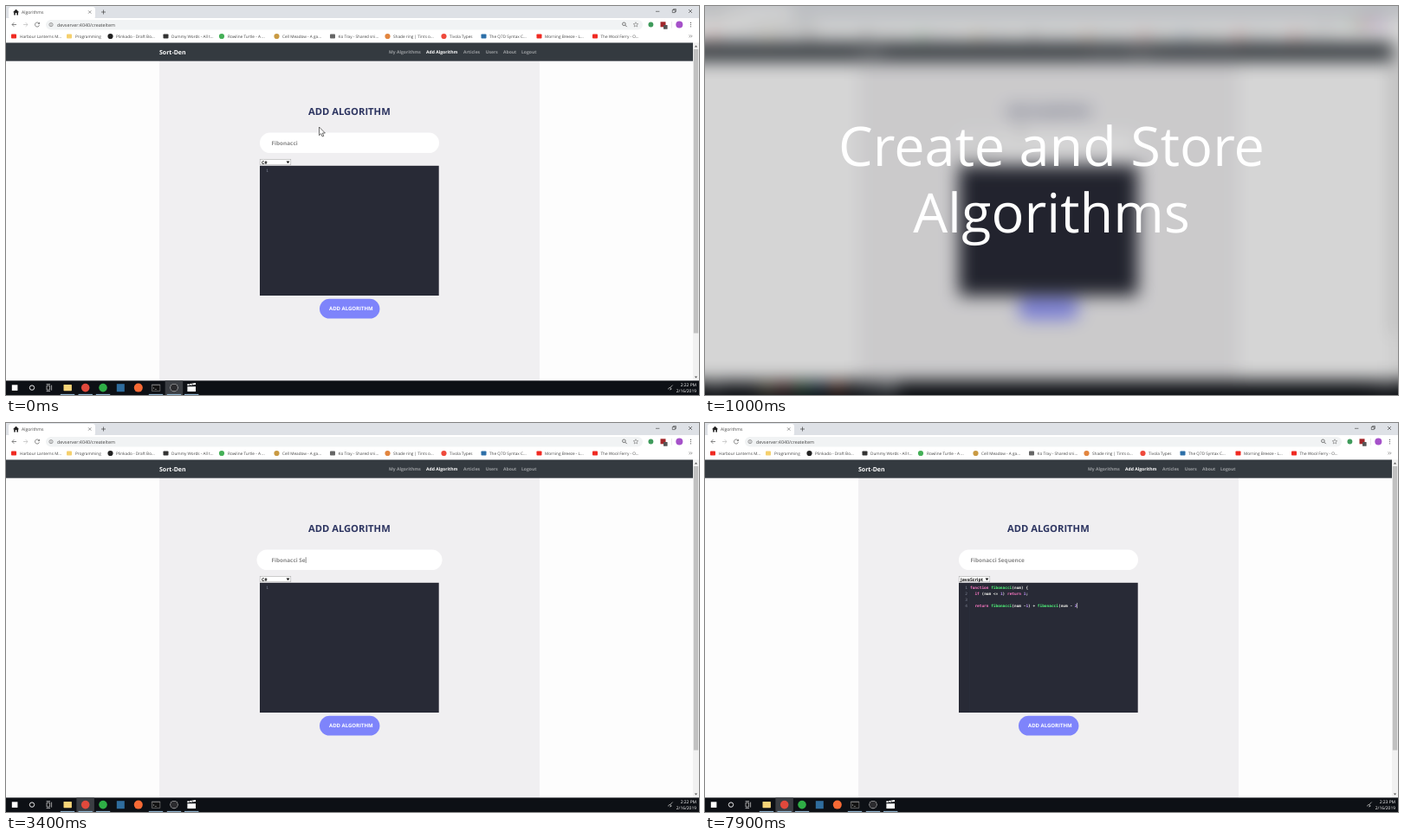
An HTML page for the animation above (8000 ms loop, 800 by 450 pixels).

```html
<!DOCTYPE html>
<html lang="en">
<head>
<meta charset="utf-8">
<title>Algorithms</title>
<style>
  html, body { margin: 0; width: 800px; height: 450px; overflow: hidden; background: #fdfdfd; }
  #stage { position: relative; width: 800px; height: 450px; overflow: hidden; }
  svg { position: absolute; left: 0; top: 0; overflow: visible; }
  text { font-family: "Open Sans", "Noto Sans", sans-serif; text-rendering: geometricPrecision; white-space: pre; }
  .b { font-weight: 700; }
  .mono { font-family: "DejaVu Sans Mono", "Liberation Mono", monospace; font-size: 4.46px; }
  #shade { position: absolute; inset: 0; background: #000; }
</style>
</head>
<body>
<div id="stage">
  <svg id="page" width="800" height="450"></svg>
  <div id="shade"></div>
  <svg id="title" width="800" height="450">
    <g font-size="63" fill="#fff" text-anchor="middle">
      <text x="400" y="185">Create and Store</text>
      <text x="400" y="262">Algorithms</text>
    </g>
  </svg>
</div>
<script>
const LOOP = 8000, STEP = 100, CUT = 3400;
const $ = id => document.getElementById(id);
const page = $('page');

function add(tag, attrs, content) {
  const el = document.createElementNS('http://www.w3.org/2000/svg', tag);
  for (const k in attrs) el.setAttribute(k, attrs[k]);
  if (content !== undefined) el.textContent = content;
  page.appendChild(el);
  return el;
}
const rect = (x, y, width, height, fill, rx = 0) => add('rect', { x, y, width, height, fill, rx });
const dot = (cx, cy, r, fill) => add('circle', { cx, cy, r, fill });
const ring = (cx, cy, r, stroke, w) => add('circle', { cx, cy, r, stroke, 'stroke-width': w, fill: 'none' });
const line = (d, stroke, w = 0.7) => add('path', { d, stroke, 'stroke-width': w, fill: 'none' });
const shape = (d, fill) => add('path', { d, fill });
const text = (x, y, size, fill, str, cls = '') => add('text', { x, y, 'font-size': size, fill, class: cls }, str);
const band = (y, h, fill) => rect(-40, y, 880, h, fill); // runs past the edges so that blur stays solid

// Browser frame
band(-40, 54, '#dee1e6');
band(14, 29, '#fff');
rect(3, 1, 100, 14, '#fff', 3);
shape('M8 7.2 L11.6 3.8 L15.2 7.2 H14 V10.4 H12.4 V8 H10.8 V10.4 H9.2 V7.2 Z', '#222');
text(18, 9, 5, '#444', 'Algorithms');
line('M95 5.3 l3.4 3.4 m0 -3.4 l-3.4 3.4', '#555', 0.6);
line('M110 7 h5 m-2.5 -2.5 v5', '#444');
line('M750 6.3 h4.4 M769.3 4.6 h3 v3 h-3 z M770.4 4.6 v-1 h3 v3 h-1 M788 4 l4 4 m0 -4 l-4 4', '#333', 0.6);
line('M12 21.5 H7 m2.3 -2.3 l-2.3 2.3 l2.3 2.3', '#555');
line('M20 21.5 h5 m-2.3 -2.3 l2.3 2.3 l-2.3 2.3', '#bbb');
line('M38.2 20.3 a2.5 2.5 0 1 0 .2 2 M38.6 18.8 v1.8 h-1.8', '#555');
rect(46, 16, 689, 11.4, '#f1f3f4', 5.7);
ring(52, 21.6, 2.1, '#666', 0.6);
line('M52 21.2 v1.6 M52 20.1 v.6', '#666', 0.6);
text(59, 23.6, 5.35, '#444', 'devserver:4040/createItem');
ring(713.4, 20.8, 1.8, '#444', 0.7);
line('M714.8 22.2 l1.9 1.9', '#444', 0.8);
line('M727 18.7 l.8 1.9 2 .1 -1.6 1.3 .6 2 -1.8 -1.1 -1.8 1.1 .6 -2 -1.6 -1.3 2 -.1 z', '#666', 0.5);
dot(744.4, 21.5, 2.9, '#3f9b5b');
rect(755.5, 18.3, 6, 6, '#a2262a');
rect(759, 22, 4.6, 4.8, '#555', 0.6);
line('M768.4 18 v7.5', '#ccc', 0.5);
dot(777.3, 21.6, 4, '#a551c9');
for (const y of [19.4, 21.6, 23.8]) dot(790.5, y, 0.6, '#555');

// Bookmarks: icon x, colour, round?, text x, label
[
  [9, '#f02a22', 0, 16, 'Harbour Lanterns M...'],
  [73, '#f5d06d', 0, 80, 'Programming'],
  [120.5, '#222', 1, 127, 'Plinkado - Draft Bo...'],
  [184.5, '#333', 0, 191, 'Dummy Words - All t...'],
  [249, '#45b058', 1, 256, 'Rowline Turtle - A ...'],
  [312.5, '#c99a43', 1, 319, 'Cell Meadow - A ga...'],
  [377, '#666', 0, 383.5, 'Ko Tray - Shared sni...'],
  [440.5, '#e2853f', 1, 447, 'Shade ring | Tints o...'],
  [505.5, '#ef4a3c', 1, 512, 'Tivola Types'],
  [551.5, '#2c6fa8', 0, 558, 'The Q7D Syntax C...'],
  [615.5, '#f02a22', 0, 622, 'Morning Breeze - L...'],
  [680, '#f02a22', 0, 686.5, 'The Wool Ferry - O...']
].forEach(([x, c, round, tx, label]) => {
  if (round) dot(x, 35, 3.1, c);
  else rect(x - 3, 32.4, 6, 5.2, c, 0.8);
  text(tx, 37, 4.7, '#444', label);
});
line('M788.6 33.4 l1.5 1.5 -1.5 1.5 m2 -3 l1.5 1.5 -1.5 1.5', '#444', 0.5);

// Site
band(42.5, 391, '#fdfdfd');
rect(177, 63, 439, 371, '#f0eff1');
rect(-40, 42.5, 833, 21.2, '#343a40');
text(177, 56.4, 7, '#fff', 'Sort-Den', 'b');
[[442, 'My Algorithms'], [485, 'Add Algorithm'], [528, 'Articles'], [553.7, 'Users'], [574, 'About'], [595, 'Logout']]
  .forEach(([x, s], i) => text(x, 55.4, 5.05, i === 1 ? '#fff' : '#9a9da0', s, 'b'));
rect(793, 42.5, 47, 391, '#f1f1f1');
rect(793.8, 50, 5.4, 328.5, '#c1c1c1');
shape('M794.8 47.4 h3.4 l-1.7 -2 z M794.8 428.6 h3.4 l-1.7 2 z', '#555');
text(349, 126, 11.2, '#2d3561', 'ADD ALGORITHM', 'b');

const field = rect(293, 146.5, 207, 23.6, '#fff', 11.8);
const fieldText = text(306.6, 161, 6.4, '#8a8a8a', '', 'b');
const fieldCaret = rect(0, 155.2, 0.6, 6.8, '#444');

rect(293.2, 177.5, 35.6, 6.3, '#fff').setAttribute('stroke', '#a0a0a0');
page.lastChild.setAttribute('stroke-width', 0.5);
const choice = text(295, 182.6, 5.2, '#111', '', 'b');
shape('M323.6 179.4 h3.8 l-1.9 2.8 z', '#111');

rect(293, 184.8, 206.7, 150.2, '#282a36');
const gutter = line('M305.3 184.8 V335', '#323541', 0.4);
const rows = [0, 1, 2, 3].map(i => {
  const y = 191.5 + i * 7.05;
  const num = text(303, y, 4.46, '#7f8596', i + 1, 'mono');
  num.setAttribute('text-anchor', 'end');
  return { num, y, code: text(306, y, 4.46, '#f8f8f2', '', 'mono b') };
});
const codeCaret = rect(0, 0, 0.6, 6.2, '#f8f8f0');

rect(362, 338.8, 69.4, 22.8, '#7e84fb', 11.4);
text(373, 352.3, 6, '#fff', 'ADD ALGORITHM', 'b');

// Taskbar
band(433.4, 60, '#0d1015');
const active = rect(0, 433.4, 20.5, 16.6, '#3b3e43');
rect(6.8, 438.3, 6.6, 6.6, '#fff');
ring(30, 441.6, 2.7, '#fff', 0.9);
line('M47 439.2 h3.6 v4.8 h-3.6 z M52.6 438.6 v6 M46.6 437.6 h4.4 M46.6 445.6 h4.4', '#ddd', 0.7);
rect(66.5, 438, 9.4, 7.2, '#f6d478', 0.6);
dot(91.7, 441.6, 4.8, '#e0493c');
dot(112, 441.6, 4.8, '#2fae46');
rect(127.8, 437.2, 9, 9, '#2f6d9e');
dot(152.8, 441.6, 5, '#f76a35');
rect(168.4, 438, 9.4, 7.4, '#111');
line('M168.4 438 h9.4 v7.4 h-9.4 z M168.4 438.6 h9.4', '#aaa', 0.5);
line('M169.6 441 l1.3 1 -1.3 1 M171.8 443.4 h2', '#ddd', 0.5);
dot(194, 441.6, 4.6, '#c9c9c9');
dot(194, 441.6, 4, '#2b2b2e');
rect(209.4, 440.2, 9.6, 5.8, '#fff');
line('M209.3 438.4 L219 437', '#fff', 1.8);
line('M211.5 437 l1 2 M214.5 436.6 l1 2', '#111', 0.7);
for (const x of [71, 91.7, 112, 173, 194, 214.2]) rect(x - 8.2, 448.9, 16.4, 1.1, '#8fb4cf');
line('M764 443.4 q2 -3 3.6 -1.4 t-1.4 2 M766.6 441.6 l3 -3', '#ddd', 0.7);
const clock = text(797, 439.6, 4.9, '#fff', '');
const date = text(797, 447.4, 4.9, '#fff', '2/16/2019');
for (const el of [clock, date]) el.setAttribute('text-anchor', 'end');

const pointer = add('path', {
  d: 'M0 0 V9.6 L2.2 7.6 L3.7 11 L5.3 10.3 L3.9 7 H6.9 Z',
  fill: '#fff', stroke: '#111', 'stroke-width': 0.6
});

// Timed steps
const NAME = 'Fibonacci Sequence';
const CODE = `function fibonacci(num) {
  if (num <= 1) return 1;

  return fibonacci(num -1) + fibonacci(num - 2`;
const END = CODE.length;
const typed = [[0, 9], [3400, 12], [3500, 13], [3700, 15], [3900, 16], [4100, 17], [4300, 18]];
const coded = [[0, 0], [6500, 1], [6600, 3], [6700, END - 9], [6800, END - 7], [7000, END - 6], [7100, END - 5],
  [7200, END - 4], [7400, END - 3], [7600, END - 2], [7900, END]];
const moves = [[0, 361.5, 140], [3400, 361.5, 140], [4900, 424, 347], [5200, 385, 246], [5300, 385, 246],
  [5600, 316.3, 182], [6000, 316.3, 190], [6300, 345, 214], [8000, 345, 214]];
const COLORS = [[/^(function|if|return)$/, '#ff79c6'], [/^fib/, '#50fa7b'], [/^\d/, '#bd93f9']];

const clamp = v => Math.min(1, Math.max(0, v));
const held = (table, t) => table.filter(s => s[0] <= t).pop()[1];
const show = (el, on) => el.setAttribute('visibility', on ? 'visible' : 'hidden');

function place(t) {
  const i = Math.max(1, moves.findIndex(m => m[0] > t));
  const [a, ax, ay] = moves[i - 1], [b, bx, by] = moves[i];
  const k = (t - a) / (b - a);
  return [ax + (bx - ax) * k, ay + (by - ay) * k];
}

function paint(el, str) {
  el.textContent = '';
  for (const part of str.match(/\w+|\W+/g) || []) {
    const span = document.createElementNS(el.namespaceURI, 'tspan');
    const hit = COLORS.find(c => c[0].test(part));
    if (hit) span.setAttribute('fill', hit[1]);
    span.textContent = part;
    el.appendChild(span);
  }
}

function draw(t) {
  // Title card over the blurred page
  const p = t < CUT ? clamp(t / 1000) : 0;
  page.style.filter = p ? `blur(${10 * p}px)` : 'none';
  $('shade').style.opacity = 0.155 * p;
  $('title').style.opacity = clamp(p * 1.25);
  $('title').style.transform = `translateY(${37 * (1 - p)}px)`;

  // Name field
  const grow = t < CUT ? 0 : 3.5 * (1 - clamp((t - 5700) / 300));
  field.setAttribute('x', 293 - grow);
  field.setAttribute('width', 207 + 2 * grow);
  fieldText.textContent = NAME.slice(0, held(typed, t));
  fieldCaret.setAttribute('x', 306.8 + fieldText.getComputedTextLength());
  show(fieldCaret, t >= CUT && t < 5700 && !(t >= 4900 && t < 5400));
  choice.textContent = t < 6000 ? 'C#' : 'JavaScript';

  // Editor
  const lines = CODE.slice(0, held(coded, t)).split('\n');
  rows.forEach((row, i) => {
    show(row.num, i < lines.length);
    paint(row.code, lines[i] || '');
  });
  const last = rows[lines.length - 1];
  codeCaret.setAttribute('x', 306 + last.code.getComputedTextLength());
  codeCaret.setAttribute('y', last.y - 4.6);
  show(codeCaret, t >= 6400);
  show(gutter, t >= 6400);

  // Desktop
  active.setAttribute('x', t < CUT ? 183.7 : 81.4);
  clock.textContent = t < 6700 ? '2:22 PM' : '2:23 PM';
  pointer.setAttribute('transform', `translate(${place(t)})`);
  show(pointer, t < CUT || (t >= 4900 && t < 6500));
}

let shown = -1;
function tick() {
  const t = Math.floor((performance.now() % LOOP) / STEP) * STEP;
  if (t !== shown) draw(shown = t);
  requestAnimationFrame(tick);
}
tick();
</script>
</body>
</html>
```
